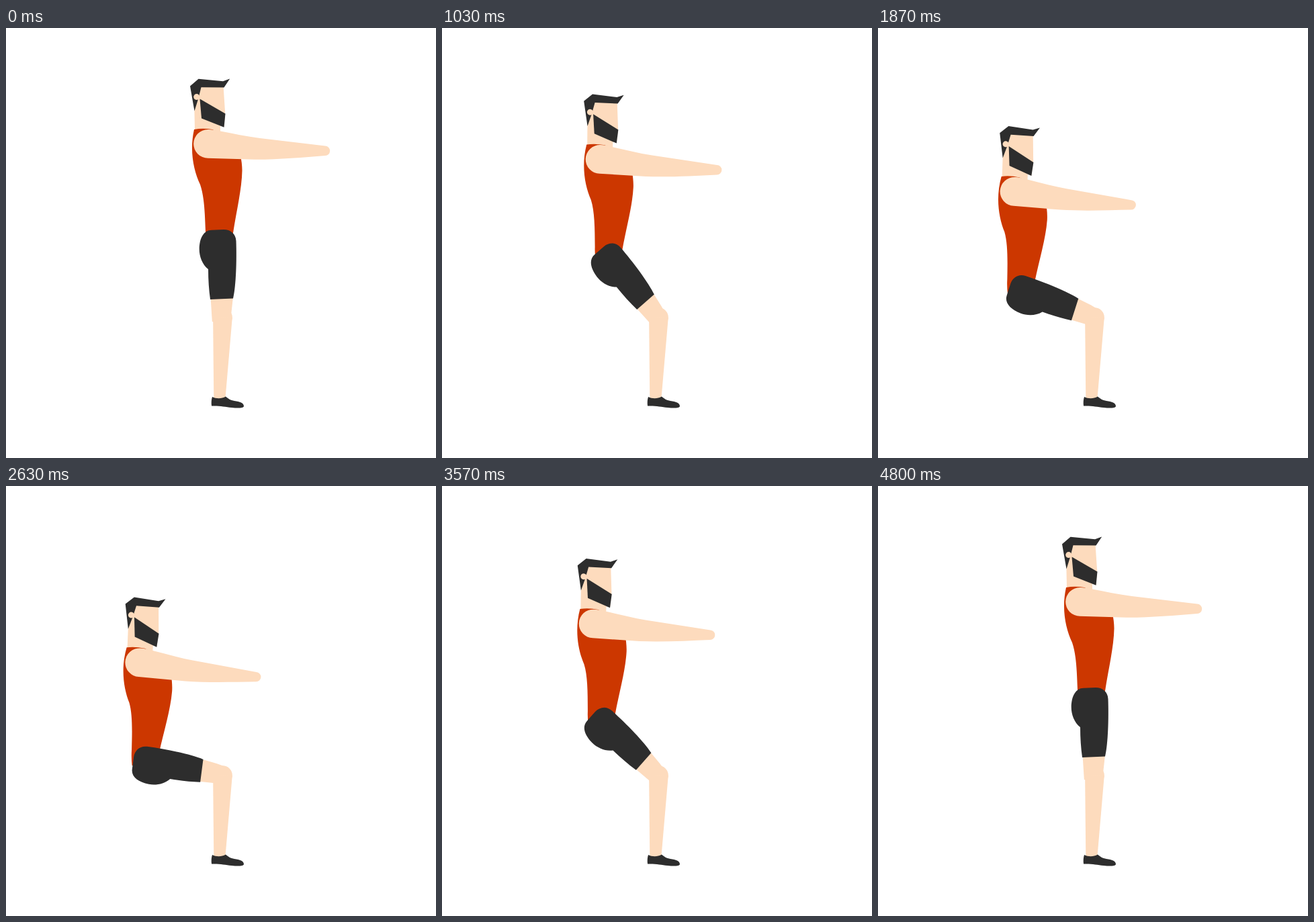
An HTML page that plays this animation: 640 px wide and 640 px high, repeating every 4.83 s.

```html
<!DOCTYPE html>
<html lang="en">
<head>
<meta charset="utf-8">
<title>Squat</title>
<style>
  html, body { margin: 0; width: 100%; height: 100%; overflow: hidden; background: #fff; }
  svg { display: block; width: 100%; height: 100%; }
  .skin { fill: #fddbbd; }
  .dark { fill: #2d2d2d; }
  .shirt { fill: #cc3700; }
</style>
</head>
<body>
<svg viewBox="0 0 640 640">
  <g id="upper">
    <path class="skin" d="M284 86H323.5L326.2 127L324.5 147L319 146V157L300 160L281 152L280.3 118Z"/>
    <path class="dark" d="M274 86.5L286.5 75.7L323 79.2L333.2 75.5L324.5 88.6L290.5 88.2L286 106L280.5 123.5Z"/>
    <circle class="skin" cx="283.7" cy="102.6" r="4.5"/>
    <path class="dark" d="M288.5 105.5L326.5 127.5L324.5 147.7L291 134.5Z"/>
    <path class="shirt" d="M280 151Q293 148.6 307 151L340 165C348 180 351.5 198 351.5 212C351 240 343 272 338 305L334 322Q316 330 299 326Q297 315 297 303C296 275 295 250 289 233C279 212 273 182 280 151Z"/>
    <path class="skin" d="M300.5 151Q307 150.8 319 153.5C338 157 358 161.5 378 164L475 175.6A7.2 7.2 0 0 1 475 190C442 192.500 405 196 370 195.800L300.500 193.700A21.350 21.350 0 0 1 300.500 151Z"/>
  </g>
  <g id="thigh">
    <path class="skin" d="M304.500 400H338L335.500 423L333.500 434L320 440L306.800 437Z"/>
    <path class="dark" d="M304 404C302 390 301 375 301 359C292 352 287.700 340 287.700 329C288 313 294 301 306 300.800L324 300C334 300 342 306 342.500 317C343.500 345 342.500 384 338 402.500Z"/>
  </g>
  <circle class="skin" cx="322.5" cy="430.5" r="14.3"/>
  <path class="skin" d="M308.200 430.500V440L309.300 553H326.300L336.800 431Z"/>
  <path class="dark" d="M307 549C313 552 321 552 327 548.500C331 552 334 554 340 555C348 556 354 558 354 563C353 566 345 566 336 565C326 564 318 562 306 562.500Q305 555 307 549Z"/>
</svg>
<script>
  const LOOP = 4830;
  const HALF = 60;                     // poses from standing to lowest
  const KNEE = [318.4, 431.2];
  const HIP = [319.6, 319.5];
  const THIGH_TURN = -89;
  const LEAN = 4;

  const upper = document.getElementById('upper');
  const thigh = document.getElementById('thigh');

  // 25 poses per second, shown on a 30 Hz clock
  function poseAt(ms) {
    const tick = Math.floor((Math.floor(ms / 10) + 0.5) * 0.3);
    return Math.ceil(tick * 5 / 6 - 0.5);
  }

  function draw(ms) {
    const depth = 1 - Math.abs(poseAt(ms) - HALF) / HALF;
    const turn = THIGH_TURN * depth;
    const a = turn * Math.PI / 180;
    const x = HIP[0] - KNEE[0];
    const y = HIP[1] - KNEE[1];
    const dx = x * Math.cos(a) - y * Math.sin(a) - x;
    const dy = x * Math.sin(a) + y * Math.cos(a) - y;
    thigh.setAttribute('transform', `rotate(${turn} ${KNEE})`);
    upper.setAttribute('transform', `translate(${dx} ${dy}) rotate(${LEAN * depth} ${HIP})`);
  }

  const start = performance.now();
  function loop() {
    draw((performance.now() - start) % LOOP);
    requestAnimationFrame(loop);
  }
  loop();
</script>
</body>
</html>
```
